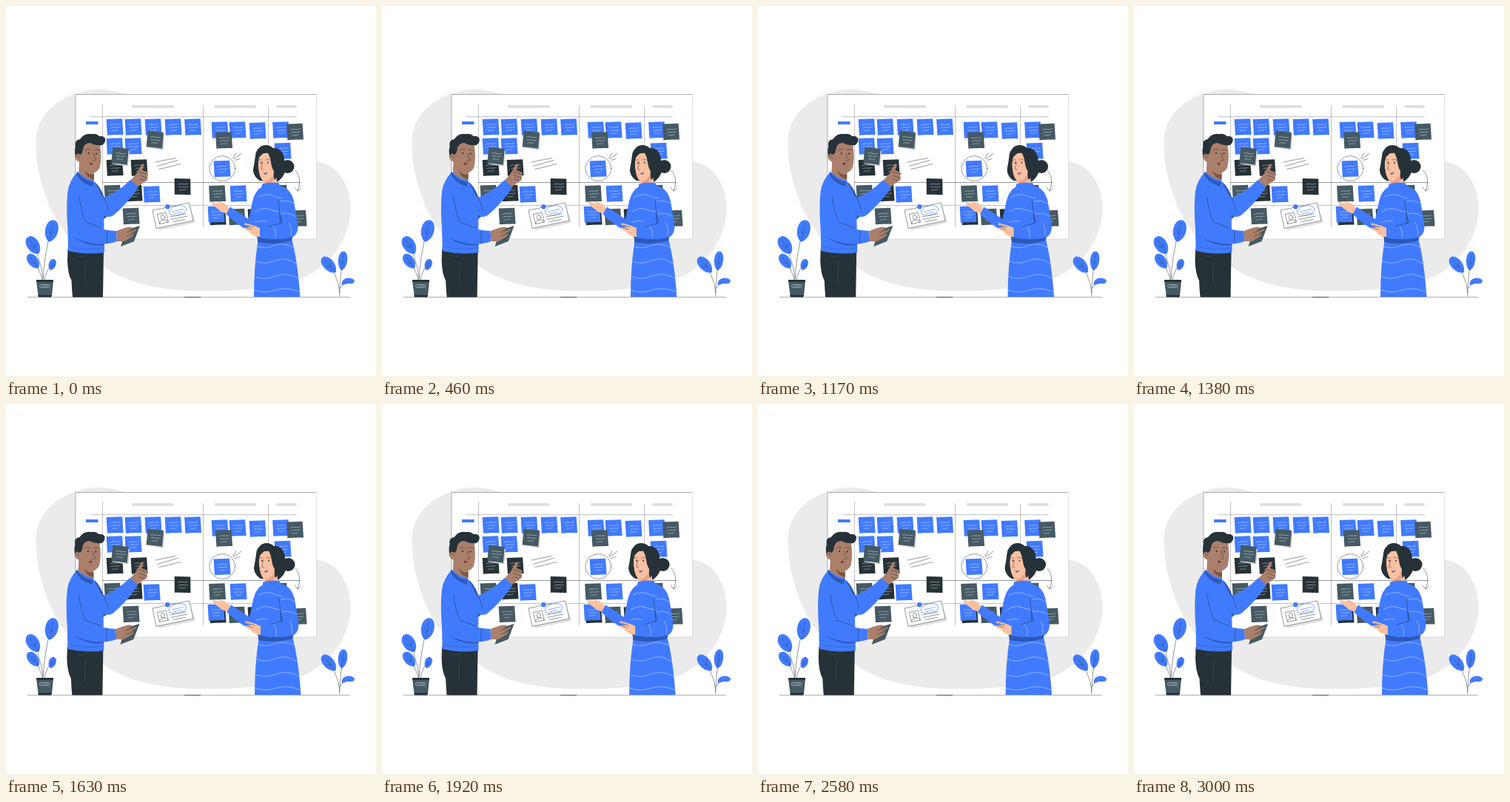
Animation of 500 by 500 pixels, one loop 3040 ms. Source, as an HTML page:

```html
<!DOCTYPE html>
<html lang="en">
<head>
<meta charset="utf-8">
<title>Planning board</title>
<style>
html, body { margin: 0; width: 100%; height: 100%; overflow: hidden; background: #fff; }
svg { display: block; width: 100%; height: 100%; }
.b { fill: #407bff; }
.s { fill: #455a64; }
.k { fill: #263238; }
.shade { fill: #2d58b8; }
.m { fill: #aa7f6b; }
.w { fill: #fbc0a0; }
.g { fill: #ebebeb; }
.line { fill: none; stroke: #263238; stroke-width: .5; stroke-linecap: round; stroke-linejoin: round; }
.thin { fill: none; stroke: #263238; stroke-width: .3; }
.wave { fill: none; stroke: #fff; stroke-width: .5; stroke-linecap: round; opacity: .8; }
</style>
</head>
<body>
<svg viewBox="0 0 500 500" xmlns="http://www.w3.org/2000/svg">
  <path class="g" d="M40.5 178C43 141 84 111 130 113C166 115 185 131 215 160L400 208Q420 207 437 216C458 228 468 256 465 284C461 318 438 351 402 367C366 381 312 386 262 385C208 385 156 373 128 349C108 334 88 322 70 292C52 262 39 218 40.5 178Z"/>

  <!-- board -->
  <rect x="93.8" y="119.5" width="325.6" height="195.7" fill="#fff"/>
  <path d="M93.8 315.2V119.5H419.4" fill="none" stroke="#888" stroke-width=".7"/>
  <path d="M93.8 315.2H419.4V119.5" fill="none" stroke="#c8c8c8" stroke-width=".6"/>
  <g fill="#e0e0e0">
    <rect x="170" y="134" width="56.5" height="3.8"/>
    <rect x="282" y="134" width="56" height="3.8"/>
    <rect x="365.5" y="134" width="27" height="3.8"/>
  </g>
  <rect class="b" x="108" y="156" width="16.5" height="4"/>
  <path class="thin" d="M130.5 132V298M266.5 134V299M354.5 135V212M113 149.7H393M130 269.5H356"/>
  <path class="line" d="M130 238.5H398"/>
  <g id="notes"></g>
  <ellipse class="line" cx="292.3" cy="219.5" rx="17.3" ry="16.8"/>
  <path class="line" d="M202 211Q216 208 229 205.5M204 216.5Q220 212 232 208.5M207 220.5Q222 217 236 213.5M306.5 206L311 198.5M308 207L318 199M310 208.5L316 206.5M391 222C398 230 398 240 394 250M390 245L394 250L398.5 246"/>

  <!-- profile card -->
  <path fill="#e0e0e0" d="M205 300L253 290L250 272L256 293L207 303Z"/>
  <path fill="#fff" stroke="#263238" stroke-width=".5" d="M198 276L247.5 266L253 290L203 300.5Z"/>
  <path class="line" d="M204.5 281.5L216 279L219.5 292L208 294.5ZM207.5 294Q208 289.5 213 289Q218 288.5 219 292M222 285L243 280.5M223 288.5L245 284M226 291.5L242 288.5"/>
  <ellipse cx="212" cy="285.5" rx="2.7" ry="3.3" class="line"/>
  <ellipse cx="232" cy="276.5" rx="12" ry="6.5" transform="rotate(-12 232 276.5)" fill="none" stroke="#407bff" stroke-width=".6"/>
  <path d="M224 278L240 274.5M226 281L238 278.5" fill="none" stroke="#407bff" stroke-width=".6"/>
  <circle class="b" cx="218.3" cy="271.3" r="3.2"/>

  <path d="M29 393.4H465" stroke="#263238" stroke-width=".4"/>
  <path d="M241 393.5H263" stroke="#263238" stroke-width=".7"/>

  <!-- plants -->
  <path class="line" d="M50 371Q51 340 62 295M50 368Q47 338 31 315M49 370Q46 355 32 338M52 370Q54 358 64 344"/>
  <path class="line" d="M450.5 392Q452 360 456 337M451 388Q449 362 431 344M451 382Q453 376 468 372"/>
  <g id="leaves"></g>
  <path class="b" d="M453.5 377.5Q453 368 463 367.5Q471 368 471 372Q470 376 463 375Q457 375 453.5 377.5Z"/>
  <path class="s" d="M41 371H64L62 391H43.5Z"/>
  <path class="k" d="M41 370H64L63.7 373H41.3ZM43 390.5H62.5L61 393.5H44Z"/>
  <rect x="45.5" y="376.5" width="13.5" height="4" rx="2" fill="none" stroke="#cfd8dc" stroke-width=".6"/>
  <path d="M48 378.5H57" stroke="#cfd8dc" stroke-width=".5"/>

  <!-- woman -->
  <g id="woman">
    <circle class="k" cx="380.5" cy="217" r="9"/>
    <path class="k" d="M341 193C345 187 355 186 361 192C370 191 376 199 376 208C382 218 376 232 366 238L343 236C334 231 332 220 337 212C337 204 336 198 341 193Z"/>
    <path class="w" d="M299 281L291 278L280 269.5Q277 266.5 279 265Q285 266.5 290 267L283 264Q289 263.5 295 266.5L303 274Z"/>
    <path class="b" d="M343 246Q336 252 333 264L328 288L303 271.5L297.5 281.5Q312 295 326 303Q336 307 341 298L350 270Z"/>
    <path class="w" d="M349 228L364 222L367 243Q357 250 347 242Z"/>
    <path fill="#e9a084" d="M350 235Q357 236 361 228L362 235Q356 242 349 240Z"/>
    <path class="w" d="M342 203C345 198 353 198 359 200C364 206 364 216 361 226C358 236 350 239.5 346 235C341 228 339 213 342 203Z"/>
    <path class="k" d="M352 195Q357 203 358 211Q359 219 362 223Q361 231 363 235L374 222L368 197ZM353 193Q347 200 342.5 204Q339.5 213 341.5 222Q342 230 346 236Q335 232 334 222L337 203Z"/>
    <path class="line" d="M342 208.5Q344 206.5 346 208M351 208Q354 206 357.5 208.5M347 211Q345.5 216 344.5 220Q345.5 221.5 347.5 221"/>
    <ellipse class="k" cx="345" cy="211.8" rx=".8" ry="1.2"/>
    <ellipse class="k" cx="354" cy="211.8" rx=".8" ry="1.2"/>
    <path d="M347.5 225Q350 226.5 353.5 224Q352 229 349 227.500Z" fill="#5f6fa8"/>
    <path class="b" d="M346 241Q357 237 369 239.5L370 243Q385 246 389 264L394 295L386 314Q394 344 397.5 393H335Q335 352 340.5 317L332 290L334 267Q338 249 346 244Z"/>
    <path class="shade" d="M340 311Q353 316 388 310L386 317Q362 324 340 319Z"/>
    <path class="wave" d="M340 258Q352 252 362 257T387 259M337 278Q348 271 357 275T388 279M337 292Q345 289 352 291M340 325Q350 329 362 324T389 326M338 345Q350 350 364 344T392 348M337 366Q349 371 364 365T395 368M336 384Q350 389 364 384T396 386"/>
    <path class="shade" d="M369 268Q370 286 374 294L350 300L370 301Z"/>
    <path class="b" d="M373 250Q386 250 389 265L394 294Q396 307 388 312Q369 318 343 313L342 299L371 294Z"/>
    <path class="wave" d="M371 264Q379 261 389 267M372 281Q381 278 391 284M361 298Q366 304 364 313M382 293Q387 300 385 310"/>
    <path class="line" d="M368 263Q369 280 373 293L355 298"/>
    <path class="w" d="M343 300L336 297L324 293.5Q321 293 323 296L331 299L322 299Q321 302 328 304Q334 312 343 312Z"/>
    <path class="line" d="M323 299L332 302M325 296L334 299"/>
  </g>

  <!-- man -->
  <g id="man">
    <path class="k" d="M83.5 328L132 330L131 393.5H90Q89 383 88.5 371Q83.5 362 83 344Z"/>
    <path d="M97 338Q108 341 111 334M108 345Q106 362 107 375" class="line" style="stroke:#455a64"/>
    <path class="m" d="M168 236L176 227L183 214.5Q185 212 186.5 214.5L184 222L191 224.5Q193 226.5 191 228.5L191.5 232Q192 236 188 237L177 245Z"/>
    <path class="line" d="M180 224L190 227M181 229L190 232M181 234L188 236"/>
    <path class="shade" d="M117 236Q127 242 132 257L142 280L130 290Z"/>
    <path class="b" d="M132 259Q151 252 168 235L179 245Q164 267 145 283Q136 288 130 280L120 246Z"/>
    <path class="line" d="M129 253Q137 266 138 276"/>
    <path class="m" d="M99 208L119 212L119 238Q108 244 98 232Z"/>
    <path d="M106 222Q113 230 119 227V234Q109 233 106 222Z" fill="#7d5543"/>
    <path class="m" d="M100 188Q112 180 127 187Q130 205 126.5 219Q121 227 114 226Q104 222 100 211Q93.500 209 93 203Q94 197 100 198Z"/>
    <path class="k" d="M94 203Q92 196 94 190Q92 181 100 180Q106 171 116 173Q122 172 126 176Q131 175 134 179Q135 185 130 188Q121 189 114 185Q105 185 104 194Q103 200 100 201Q96 197 94 203Z"/>
    <path class="line" d="M107 195Q110 192.5 114 194M119 194.5Q122 193 126 195M118 199Q119 205 121.5 208Q120 210 117.5 209.5M96 203Q98 201 99 205"/>
    <ellipse class="k" cx="111.5" cy="199" rx=".9" ry="1.3"/>
    <ellipse class="k" cx="122" cy="199.5" rx=".9" ry="1.3"/>
    <path d="M112.5 213Q115 211 117.500 212.5Q117 215 114.500 215Z" fill="#7a4038"/>
    <path class="b" d="M97 224Q107 234 118 235L121 241Q131 255 132 273L133 333Q111 337 84 331L83.5 302Q81 272 83.5 250Q86 235 97 224Z"/>
    <path class="shade" d="M96 224Q104 236 118 238L117 244Q102 240 95 227Z"/>
    <path class="shade" d="M104 300L133 304V323Q112 326 94 314Z"/>
    <path class="line" style="stroke:#2d58b8" d="M84 325Q110 331 133 327"/>
    <path class="b" d="M85 243Q99 240 103 262L108 293Q130 304 149 304L150 318Q127 326 102 317Q86 312 84 296Z"/>
    <path class="line" d="M99 258Q102 280 108 292L129 300M137 304Q135 312 137 321"/>
    <path class="s" d="M162 303L181 297L173 318L155 325Z"/>
    <path class="line" d="M164 304L180 298.5"/>
    <path class="m" d="M149 304L160 300Q169 297 172 300L165 304L176 301Q178 302 175 304L166 309L172 307Q175 309 170 312L160 318L150 318Z"/>
    <path class="line" d="M163 306L174 302.5M163 311L172 308.5"/>
  </g>
</svg>
<script>
const LOOP = 3040, FRAMES = 73, FPS = 24, PX = .65;
const el = id => document.getElementById(id);

// class, centre x, centre y, tilt
const notes = [
  ['b', 147, 163.5], ['b', 172, 163.5], ['b', 199, 163.5], ['b', 226, 163.5], ['b', 252.5, 163.5],
  ['b', 289, 167.5], ['b', 313, 167.5], ['b', 340, 168.5], ['b', 371.5, 167.5], ['s', 390.5, 170],
  ['b', 147, 189.5], ['b', 172, 189.5], ['k', 147, 218.5], ['k', 180, 218.5],
  ['s', 201.3, 180.5, 7], ['s', 154, 202.5, 7], ['s', 294.5, 181.5], ['b', 374, 196],
  ['b', 292, 220], ['k', 238.5, 244, 1], ['s', 144, 253], ['k', 173, 253], ['b', 197, 254.5],
  ['s', 169, 284], ['s', 285.5, 253.5], ['b', 314, 253.5], ['s', 369, 253],
  ['k', 286, 285], ['b', 284, 281.5], ['s', 312, 285], ['k', 338, 285], ['s', 395, 287]
];
const squiggle = (x, y, w) => `M${x} ${y}q${w / 4} -1.2 ${w / 2} -.4t${w / 2} -.6`;
el('notes').innerHTML = notes.map(([c, x, y, tilt = -2]) => `
  <g transform="translate(${x} ${y}) rotate(${tilt})">
    ${tilt > 2 ? '<path d="M-10 9L12 -9L13 13L-9 12Z" fill="#d6d6d6"/>' : ''}
    <path class="${c}" d="M-11 -10.8H10.5L11.2 11Q0 10.3 -10.5 11Z"/>
    <path class="wave" d="${squiggle(-6, -3, 13)}${squiggle(-5, 1, 12)}${squiggle(-4, 5, 8)}"/>
  </g>`).join('');

// centre x, centre y, half width, half length, tilt
const leaves = [
  [61.5, 304, 9, 15, 12], [37, 323.5, 8.5, 13.5, -32], [37, 345, 7, 11.5, -37], [62.5, 349.5, 5, 7.8, 18],
  [436.5, 350, 7.5, 13.5, -42], [455, 344.5, 6.3, 13, 6]
];
el('leaves').innerHTML = leaves.map(([x, y, w, h, tilt]) => `
  <g transform="translate(${x} ${y}) rotate(${tilt})">
    <path class="b" d="M0 ${h}C${-w * 1.4} ${h * .6} ${-w * 1.2} ${-h} 0 ${-h}S${w * 1.4} ${h * .6} 0 ${h}Z"/>
    <path class="thin" d="M0 ${-h * .7}V${h}M${-w * .5} ${-h * .1}L0 ${h * .3}L${w * .5} ${-h * .1}"/>
  </g>`).join('');

// sideways shake, one value every tenth of a cycle
const shake = [0, -1, 2, -4, 4, -4, 4, -4, 2, -1, 0];

// the CSS "ease" curve
function ease(u) {
  let lo = 0, hi = 1, s = .5;
  for (let i = 0; i < 18; i++) {
    s = (lo + hi) / 2;
    if (.75 * s * (1 - s) + s ** 3 < u) lo = s; else hi = s;
  }
  return .3 * s * (1 - s) ** 2 + 3 * s * s * (1 - s) + s ** 3;
}
function sway(id, sec, period) {
  const p = sec % period / period * 10, i = Math.floor(p);
  const x = PX * (shake[i] + (shake[i + 1] - shake[i]) * ease(p - i));
  el(id).setAttribute('transform', `translate(${x.toFixed(3)} 0)`);
}

const start = performance.now();
function draw(now) {
  const ms = Math.max(0, now - start) % LOOP;
  const sec = Math.min(FRAMES - 1, Math.floor((ms + 4) / LOOP * FRAMES)) / FPS;
  sway('man', sec, 1.5);
  sway('woman', sec, 3);
  requestAnimationFrame(draw);
}
draw(start);
</script>
</body>
</html>
```
